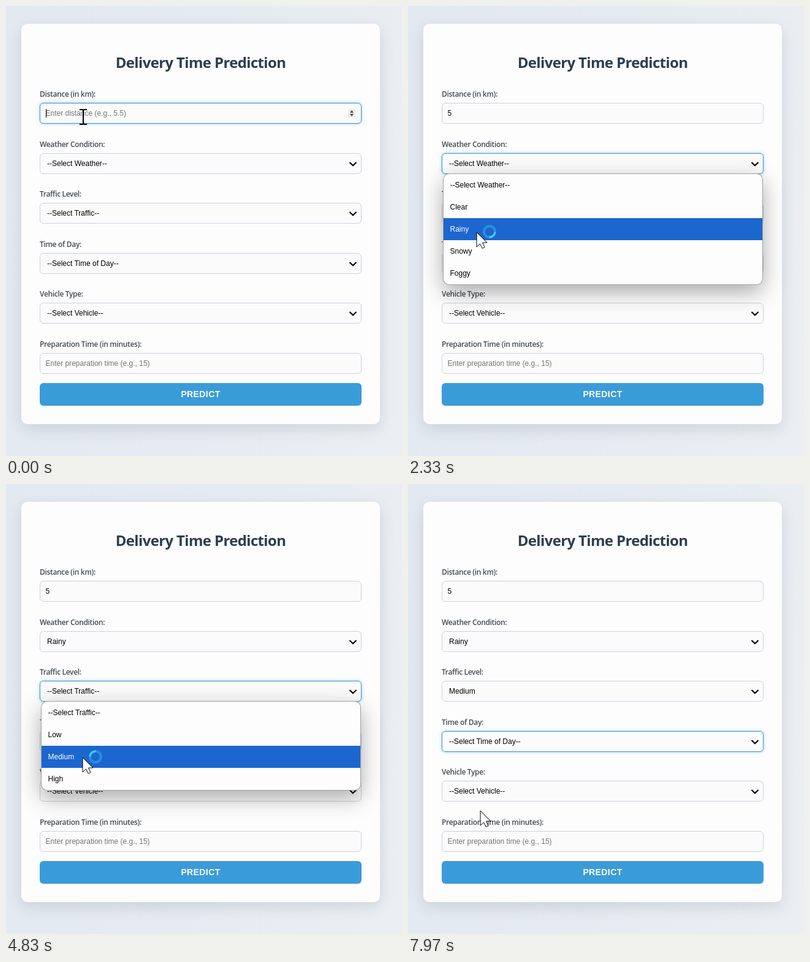
An HTML page that plays this animation: 646x734 px, repeating every 8000 ms.

```html
<!DOCTYPE html>
<html lang="en">
<head>
<meta charset="utf-8">
<title>Delivery Time Prediction</title>
<style>
  html, body { margin: 0; width: 100%; height: 100%; overflow: hidden; }
  #stage {
    position: relative; width: 646px; height: 734px; overflow: hidden;
    background: linear-gradient(100deg, #e3e9f1, #e6ebf2 55%, #ebeff3);
    font: 12px "Liberation Sans", Arial, sans-serif; color: #000;
  }
  #stage *, #stage { box-sizing: border-box; }
  #stage > *, .caret, .stepper, .field svg { position: absolute; white-space: nowrap; }
  .card {
    left: 25px; top: 29px; width: 585px; height: 653px; border-radius: 10px;
    background: #fdfdfd; box-shadow: 0 8px 25px rgb(20 30 50 / .12);
  }
  h1 {
    left: 25px; top: 72px; width: 585px; margin: 0; text-align: center; color: #2c3e50;
    font: 700 24px/40px "Open Sans", "Noto Sans", sans-serif; letter-spacing: -.65px;
  }
  .label {
    left: 55px; color: #444b53; letter-spacing: -.33px;
    font: 600 12px/20px "Open Sans", "Noto Sans", sans-serif;
  }
  .field {
    --focus: 0; left: 55px; width: 525px; height: 34px; padding-left: 11px;
    line-height: 32px; border-radius: 6px; background: #fbfbfc;
    border: 1px solid color-mix(in srgb, #3498db calc(var(--focus) * 100%), #cfd0de);
    box-shadow: 0 0 5px rgb(52 152 219 / calc(var(--focus) * .5));
  }
  .field.input { padding-left: 8.5px; }
  .placeholder { color: #757575; }
  .field svg { left: 503px; top: 12px; }
  .stepper { left: 502px; top: 9px; width: 12px; height: 14px; background: #ececec; }
  .stepper::before, .stepper::after {
    content: ""; position: absolute; left: 3px; border: 3px solid transparent;
  }
  .stepper::before { top: -1px; border-bottom: 4px solid #484848; }
  .stepper::after { bottom: -1px; border-top: 4px solid #484848; }
  .caret { top: 9px; width: 1px; height: 14px; background: #000; }
  .button {
    left: 55px; top: 615px; width: 525px; height: 37px; border-radius: 6px;
    background: #3a9bd9; color: #fff; text-align: center;
    font-weight: 700; font-size: 14px; line-height: 36px; letter-spacing: .4px;
  }
  .popup {
    left: 58px; width: 520px; border-radius: 9px; background: #fdfdfd; overflow: hidden;
    box-shadow: 0 0 0 1px #a0a0a6, 0 12px 36px rgb(0 0 0 / .34);
  }
  .popup div { height: 36px; line-height: 36px; padding-left: 10.5px; }
  .popup .active { background: #1c66cf; color: #fff; }
  #pointer { left: 0; top: 0; overflow: visible; }
</style>
</head>
<body>
<div id="stage">
  <div class="card"></div>
  <h1>Delivery Time Prediction</h1>
  <div class="button">PREDICT</div>
</div>
<script>
const LOOP = 8000, ROW = 36, FADE = 200;
const TYPED_AT = 600, ARROW_AT = 800;
const stage = document.getElementById('stage');

// focus: [start, end] of keyboard focus; open: [start, end] of the list
const fields = [
  { label: 'Distance (in km):', y: 158, hint: 'Enter distance (e.g., 5.5)', focus: [-1000, 1650] },
  { label: 'Weather Condition:', y: 240, hint: '--Select Weather--', focus: [1650, 3640],
    options: ['Clear', 'Rainy', 'Snowy', 'Foggy'], open: [1700, 2700], listTop: 274, pick: 'Rainy' },
  { label: 'Traffic Level:', y: 321, hint: '--Select Traffic--', focus: [3640, 6150],
    options: ['Low', 'Medium', 'High'], open: [3700, 4900], listTop: 355, pick: 'Medium' },
  { label: 'Time of Day:', y: 403, hint: '--Select Time of Day--', focus: [6150, 9000],
    options: ['Morning', 'Afternoon', 'Evening', 'Night'], open: [6200, 7930], listTop: 439 },
  { label: 'Vehicle Type:', y: 484, hint: '--Select Vehicle--', options: [] },
  { label: 'Preparation Time (in minutes):', y: 566, hint: 'Enter preparation time (e.g., 15)' },
];

// time, x, y of the pointer
const path = [
  [0, 126, 181], [700, 126, 181], [1150, 116, 262], [1850, 116, 262], [2250, 112, 369],
  [2800, 112, 369], [3450, 138, 331], [3900, 138, 331], [4500, 125, 446], [5200, 125, 446],
  [5700, 116, 433], [6450, 116, 433], [6900, 117, 481], [7150, 117, 481], [7500, 118, 533],
  [LOOP, 118, 533],
];
const busyTimes = [[1100, 2750], [4100, 4900], [5500, 7350]];

const clamp = (v, lo, hi) => Math.min(hi, Math.max(lo, v));
const within = (t, range) => !!range && t >= range[0] && t < range[1];

function add(parent, className, text, top) {
  const el = document.createElement('div');
  el.className = className;
  el.textContent = text;
  if (top !== undefined) el.style.top = top + 'px';
  return parent.appendChild(el);
}

for (const f of fields) {
  add(stage, 'label', f.label, f.y - 24);
  f.el = add(stage, f.options ? 'field' : 'field input', '', f.y);
  f.text = f.el.appendChild(document.createElement('span'));
  if (f.options) {
    f.el.insertAdjacentHTML('beforeend',
      '<svg width="14" height="10"><path d="M1.5 2L7 7.3 12.5 2" fill="none" stroke="#000" stroke-width="2.2"/></svg>');
  }
}
for (const f of fields.filter(f => f.open)) {
  f.popup = add(stage, 'popup', '', f.listTop);
  f.rows = [f.hint, ...f.options].map(option => add(f.popup, '', option));
}
const stepper = add(fields[0].el, 'stepper', '');
const caret = add(fields[0].el, 'caret', '');

stage.insertAdjacentHTML('beforeend', `
  <svg id="pointer" width="40" height="40">
    <path id="beam" d="M-6-12h4q2 0 2 2q0-2 2-2h4M0-11V11M-6 12h4q2 0 2-2q0 2 2 2h4"
      fill="none" stroke="#000" stroke-width="2"/>
    <path id="arrow" d="M0 0V24L5.5 19 9.3 26.3 13 24.6 9.6 17H17Z" fill="#fff" stroke="#000"/>
    <g id="busy" transform="translate(21 -1)" fill="none">
      <circle r="9" stroke="#2a8fdc" stroke-width="4"/>
      <path id="arc" d="M0-9A9 9 0 0 1 9 0" stroke="#4cc8f6" stroke-width="3"/>
    </g>
  </svg>`);
const [pointer, beam, arrow, busy, arc] =
  ['pointer', 'beam', 'arrow', 'busy', 'arc'].map(id => document.getElementById(id));
const show = (el, on) => { el.style.display = on ? '' : 'none'; };

function pointerAt(t) {
  const i = path.findIndex((p, k) => k > 0 && t <= p[0]);
  const [t0, x0, y0] = path[i - 1], [t1, x1, y1] = path[i];
  const u = (t - t0) / (t1 - t0), e = u * u * (3 - 2 * u);
  return [x0 + (x1 - x0) * e, y0 + (y1 - y0) * e];
}

function focusAt(t, range) {
  if (!range) return 0;
  return clamp(Math.min((t - range[0]) / FADE, 1 - (t - range[1]) / FADE), 0, 1);
}

function render(t) {
  const [x, y] = pointerAt(t);
  for (const f of fields) {
    f.el.style.setProperty('--focus', focusAt(t, f.focus));
    const typed = f === fields[0] && t >= TYPED_AT;
    const picked = f.pick && t >= f.open[1];
    f.text.textContent = typed ? '5' : picked ? f.pick : f.hint;
    f.text.className = f.options || typed ? '' : 'placeholder';
    if (f.popup) {
      show(f.popup, within(t, f.open));
      const hovered = clamp(Math.floor((y - f.listTop) / ROW), 0, f.rows.length - 1);
      f.rows.forEach((row, i) => row.classList.toggle('active', i === hovered));
    }
  }
  show(stepper, t < fields[0].focus[1]);
  show(caret, t < 500 || within(t, [TYPED_AT, TYPED_AT + 500]));
  caret.style.left = (t < TYPED_AT ? 9 : 16) + 'px';

  pointer.style.transform = `translate(${x}px, ${y}px)`;
  show(beam, t < ARROW_AT);
  show(arrow, t >= ARROW_AT);
  show(busy, busyTimes.some(range => within(t, range)));
  arc.setAttribute('transform', `rotate(${(t * .36 - 25) % 360})`);
}

function tick() {
  render(performance.now() % LOOP);
  requestAnimationFrame(tick);
}
tick();
</script>
</body>
</html>
```
